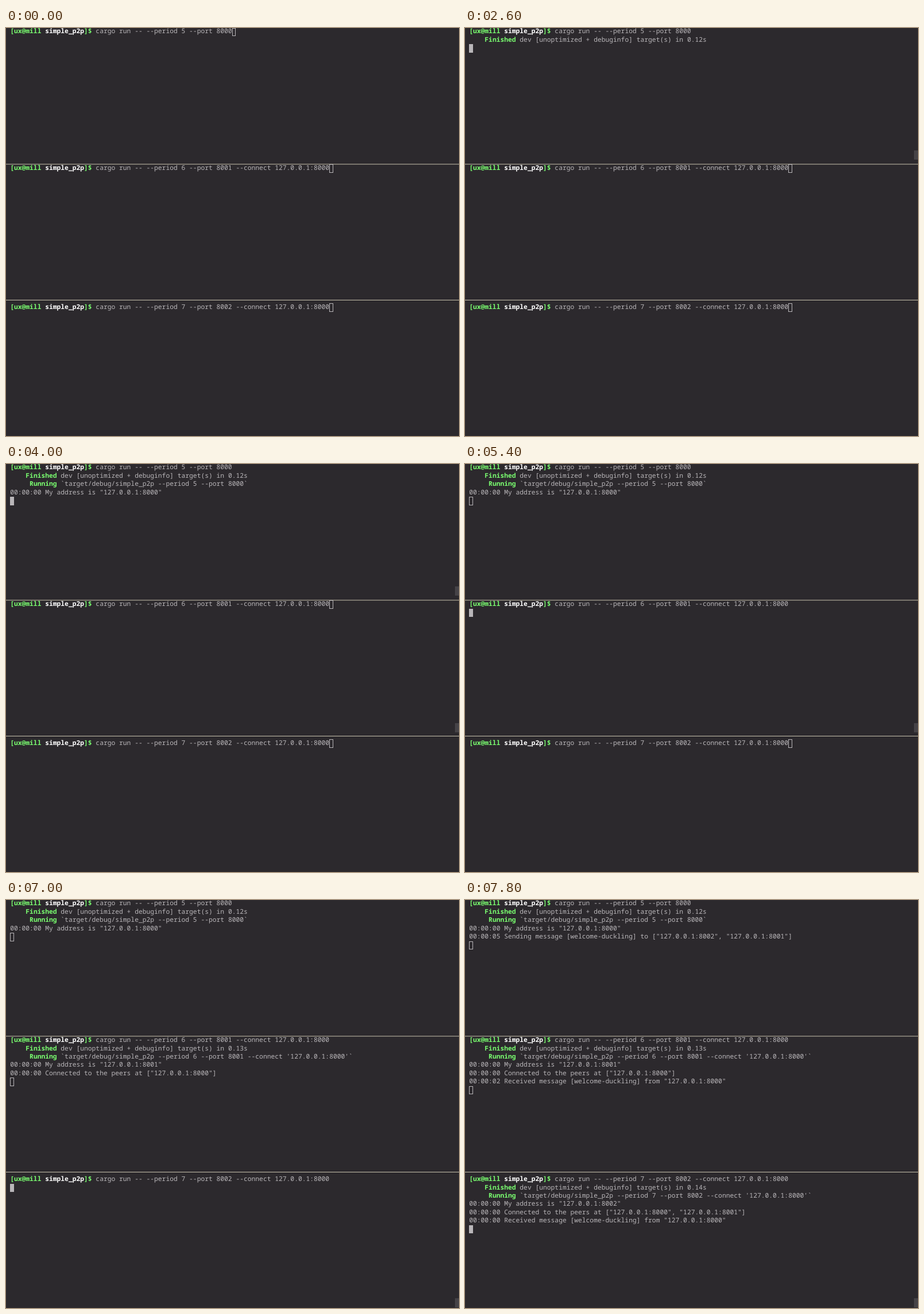
Write an HTML page with a canvas that moves like this. It is 789 by 710 pixels and loops after 8 s.

```html
<!DOCTYPE html>
<html lang="en">
<head>
<meta charset="utf-8">
<title>Three terminals</title>
<style>
  html, body { margin: 0; width: 100%; height: 100%; overflow: hidden; background: #2c292d; }
  canvas { display: block; }
</style>
</head>
<body>
<canvas id="stage" width="789" height="710"></canvas>
<script>
const ctx = document.getElementById('stage').getContext('2d');
const W = 789, H = 710, LOOP = 8000;
const LEFT = 7.2, CELL = 6.78, ROW = 14.4, BASELINE = 10.2;
const FONT = '11.3px "Noto Sans Mono", "DejaVu Sans Mono", monospace';
const BG = '#2c292d', GREY = '#b9b6b9', GREEN = '#7aff70', WHITE = '#ffffff';
const RULE = '#c9c3ae', THUMB = '#464347';
const HOST = '127.0.0.1:';

const bold = (text, color) => ({ text, color, bold: true });
const plain = text => ({ text, color: GREY });
const line = (at, ...spans) => ({ at, spans });
const quote = port => `"${HOST}${port}"`;

// Lines every pane shares: prompt, build status, command and own address.
function session(period, port, seconds, done, run, connect) {
  const args = `--period ${period} --port ${port}`;
  const peer = HOST + 8000;
  return [
    line(0, bold('[ux@mill ', GREEN), bold('simple_p2p', WHITE), bold(']$ ', GREEN),
      plain(`cargo run -- ${args}` + (connect ? ` --connect ${peer}` : ''))),
    line(done, bold('    Finished ', GREEN),
      plain(`dev [unoptimized + debuginfo] target(s) in ${seconds}s`)),
    line(run, bold('     Running ', GREEN),
      plain('`target/debug/simple_p2p ' + args + (connect ? ` --connect '${peer}'` : '') + '`')),
    line(run, plain(`00:00:00 My address is ${quote(port)}`))
  ];
}

const connected = (at, ...ports) =>
  line(at, plain(`00:00:00 Connected to the peers at [${ports.map(quote).join(', ')}]`));
const received = (at, clock) =>
  line(at, plain(`${clock} Received message [welcome-duckling] from ${quote(8000)}`));

const panes = [
  {
    top: -0.35, focus: [1000, 4600], thumb: [400, 5200], thumbY: 213, enter: 2600,
    lines: [
      ...session(5, 8000, '0.12', 2600, 2800, false),
      line(7800, plain(`00:00:05 Sending message [welcome-duckling] to [${quote(8002)}, ${quote(8001)}]`))
    ]
  },
  {
    top: 237.45, focus: [4600, 6200], thumb: [4000, 6600], thumbY: 451, enter: 5400,
    lines: [
      ...session(6, 8001, '0.13', 5600, 5600, true),
      connected(5600, 8000),
      received(7800, '00:00:02')
    ]
  },
  {
    top: 479.45, focus: [6200, LOOP], thumb: [6000, LOOP], thumbY: 693, enter: 7000,
    lines: [
      ...session(7, 8002, '0.14', 7200, 7200, true),
      connected(7200, 8000, 8001),
      received(7800, '00:00:00')
    ]
  }
];

const within = (t, [from, to]) => t >= from && t < to;
const length = ({ spans }) => spans.reduce((n, s) => n + s.text.length, 0);

function rect(color, x, y, w, h) {
  ctx.fillStyle = color;
  ctx.fillRect(x, y, w, h);
}

// Each word starts on its terminal column.
function drawLine({ spans }, y) {
  let col = 0;
  for (const span of spans) {
    ctx.font = (span.bold ? 'bold ' : '') + FONT;
    ctx.fillStyle = span.color;
    for (const word of span.text.matchAll(/\S+/g)) {
      ctx.fillText(word[0], LEFT + (col + word.index) * CELL, y);
    }
    col += span.text.length;
  }
}

function drawCursor(col, y, filled) {
  const left = LEFT + col * CELL;
  const x = Math.round(left), w = Math.round(left + CELL) - x;
  const top = Math.round(y), h = Math.round(y + ROW) - top;
  if (filled) {
    rect(GREY, x, top, w, h);
  } else {
    ctx.strokeStyle = GREY;
    ctx.lineWidth = 1;
    ctx.strokeRect(x + 0.5, top + 0.5, w - 1, h - 1);
  }
}

function drawPane(pane, t) {
  const shown = pane.lines.filter(l => t >= l.at);
  shown.forEach((l, i) => drawLine(l, Math.floor(pane.top + i * ROW + BASELINE)));
  const entered = t >= pane.enter;
  const row = entered ? shown.length : 0;
  const col = entered ? 0 : length(shown[0]);
  drawCursor(col, pane.top + row * ROW, within(t, pane.focus));
  if (within(t, pane.thumb)) rect(THUMB, 782, pane.thumbY, 7, 16);
}

const start = performance.now();
function draw() {
  const t = (performance.now() - start) % LOOP;
  rect(BG, 0, 0, W, H);
  rect(RULE, 0, 236.5, W, 1);
  rect(RULE, 0, 473, W, 1);
  ctx.textBaseline = 'alphabetic';
  ctx.textRendering = 'geometricPrecision';
  panes.forEach(pane => drawPane(pane, t));
  requestAnimationFrame(draw);
}
draw();
</script>
</body>
</html>
```
